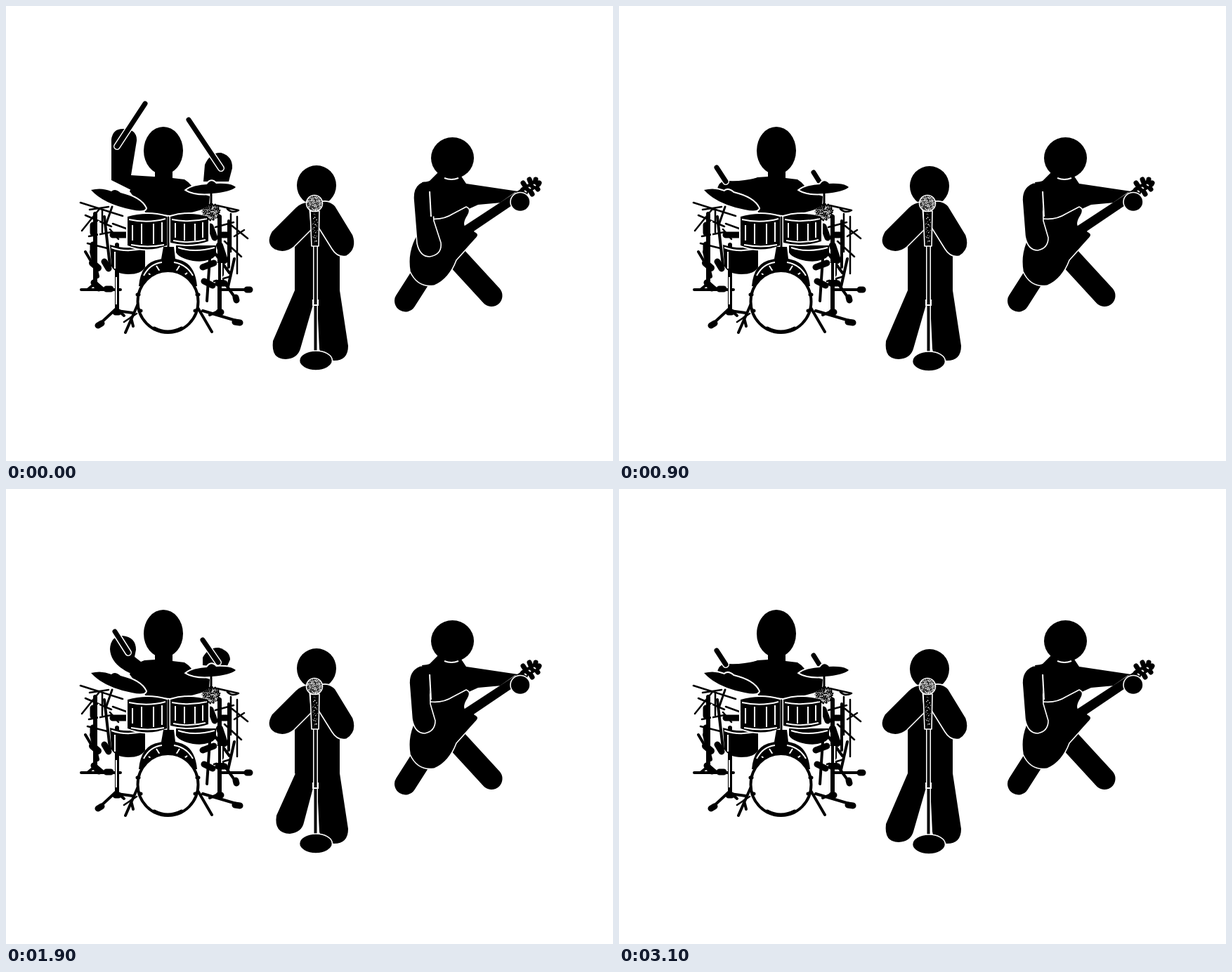
An HTML page that plays this animation: 864 px wide and 648 px high, repeating every 3200 ms.

```html
<!DOCTYPE html>
<html lang="en">
<head>
<meta charset="utf-8">
<title>Band</title>
<style>
  html, body { margin: 0; width: 100%; height: 100%; overflow: hidden; background: #fff; }
  svg { display: block; width: 100%; height: 100%; }
  .line { fill: none; stroke: #000; stroke-linecap: round; stroke-linejoin: round; }
  .limb { stroke-width: 31; }
  .rim { stroke: #fff; stroke-width: 4; paint-order: stroke; }
  .edge { stroke: #fff; stroke-width: 1.6; stroke-linejoin: round; }
  .shine { fill: none; stroke: #fff; stroke-width: 2; }
</style>
</head>
<body>
<svg viewBox="0 0 864 648">
  <!-- Drummer -->
  <g id="drummer">
    <ellipse cx="224" cy="206" rx="28" ry="34"/>
    <path d="M212 232H237V245L254 247Q264 253 268 263L290 271L289 284Q278 294 235 298L200 296L176 264Q182 249 197 244L212 243Z"/>
    <g data-poses="A">
      <path d="M150 190Q152 174 168 175Q187 176 186 192L178 241L210 243V290L180 263L150 248Z"/>
      <path d="M281 250L283 226Q291 208 306 209Q323 214 322 231L317 250Z"/>
    </g>
    <g data-poses="B">
      <path d="M149 223Q150 205 167 205Q185 206 185 222L183 238L192 246L212 245V290L178 263Q150 249 149 223Z"/>
      <path d="M280 250V238Q286 222 303 222Q319 226 319 240L313 253Z"/>
    </g>
    <g data-poses="C">
      <path d="M148 228Q149 209 166 209Q185 211 185 229L183 239L192 246L212 245V290L178 263Q149 250 148 228Z"/>
      <path d="M280 251V240Q288 225 303 226Q319 231 319 243L314 254Z"/>
    </g>
    <path data-poses="D" d="M140 263Q140 249 155 249Q176 250 195 245L205 290L180 272Z"/>
    <g id="sticks"></g>
  </g>

  <!-- Drum kit -->
  <g id="kit">
    <path class="line" stroke-width="6" d="M127 296V394M158 340V432M304 300V436M122 350L130 385"/>
    <path class="line" stroke-width="4" d="M107 404H163M128 394L116 404M128 394L140 404M158 430L130 456M158 434L180 437M158 432L168 441M188 424L170 465M178 444L181 456M272 428L293 464M280 434L334 450M304 434L290 440M303 404H349M308 390L328 418M317 306V372M325 360L316 400M140 300L148 370M290 360L286 420M113 350L126 372M296 350L318 380"/>
    <path class="line" stroke-width="2.5" d="M106 280L166 299M108 320L133 289M119 290L146 286M113 298L150 314M329 300V381M318 310L344 331M325 328L339 319M300 284L331 291Q322 296 315 289M118 328L150 322M116 338L144 345M311 335L335 357M320 296V350M298 315L324 308M168 450L186 438M137 290V322M152 310L174 318M278 300L298 323M296 392L320 385M148 318L160 332"/>
    <path class="line" stroke-width="9" d="M131 455L136 452M156 436H160M326 450L333 451M343 404H347M327 415L328 419M303 436H306M125 394L132 402M143 403H149M124 312V323M124 340V348M308 326H314M302 395H311M152 326H170M140 364L146 374M280 372L296 366M282 392L294 398M291 314L297 330"/>
    <path d="M148 340Q172 348 198 341V372Q193 382 174 382Q157 382 150 371ZM242 341H299V355Q289 366 266 363Q246 359 242 351Z"/>
    <path class="line" stroke-width="10" d="M304 341L311 362M305 372V382M123 366L131 373"/>
    <path class="shine" d="M150 344Q172 352 196 345M155 350V374M245 344Q268 352 297 344M132 306V334M157 386V425M301 366V390M307 366V390"/>
    <path class="rim" d="M173 300Q201 292 229 300V341Q202 352 173 341ZM234 300Q260 292 288 300V335Q262 344 234 337Z"/>
    <path class="shine" stroke-width="1.500" d="M175 304Q202 310 227 303M178 340Q202 345 225 340M236 304Q260 309 286 303M238 334Q260 339 284 333"/>
    <path class="shine" stroke-width="3" d="M180 312V334M193 310V339M210 310V339M222 308V336M241 309V330M254 310V334M269 310V334M280 308V330"/>
    <path class="line" stroke-width="3" d="M231 301V360"/>
    <path d="M224 343H239L241 360H221ZM189 399Q192 365 218 361Q231 356 245 361Q269 366 272 399Z"/>
    <path class="shine" d="M196 384Q205 367 222 365M239 365Q257 368 266 384M214 370L219 378M247 370L242 378M203 381L210 386M258 380L250 386"/>
    <ellipse cx="230.500" cy="421" rx="43" ry="44" fill="#fff" stroke="#000" stroke-width="4"/>
    <path class="line" stroke-width="5" d="M211 459Q230 469 250 459"/>
    <path class="line" stroke-width="5" d="M187 411H189M272 411H274M190 434H192M269 434H271"/>
    <path class="line" stroke-width="1.700" data-poses="E" d="M232 391V413M233 429V450M203 427L222 426M238 422H257M215 408L223 416M241 416Q247 412 250 404M239 430L251 438M219 439Q226 438 226 432"/>
    <path class="rim" d="M121 262Q136 258 150 264Q155 259 163 266Q192 273 199 288Q197 294 179 290Q139 282 121 262Z"/>
    <path class="rim" d="M257 262Q266 255 286 254Q292 245 299 253Q321 252 327 258Q319 265 293 267Q268 269 257 262Z"/>
    <path class="line" stroke-width="3" d="M151 286L142 312M292 267V286"/>
    <g id="clutch"></g>
  </g>

  <!-- Singer -->
  <g id="singer">
    <ellipse class="bob" cx="442" cy="255.500" rx="28" ry="28.500"/>
    <path d="M422 280H464L475 345V405L487 484Q487 505 467 505Q448 503 446 488L443 424H437L411 405V320Z"/>
    <path data-poses="ABDE" d="M414 385L411 405L380 477Q377 503 398 503Q415 502 419 488L438 422V385Z"/>
    <path data-poses="C" d="M414 385L412 405L385 465Q381 490 404 491Q421 489 424 475L438 422V385Z"/>
    <path class="edge" d="M431 279Q420 279 412 287L378 321Q368 338 382 347Q397 354 410 343L435 318Z"/>
    <path class="edge" d="M447 279Q460 275 469 285L494 326Q501 346 485 356Q472 359 464 346L444 314Q439 289 447 279Z"/>
    <path fill="none" stroke="#fff" stroke-width="7" d="M440.500 340V494"/>
    <path fill="none" stroke="#000" stroke-width="4" d="M440.500 340V496"/>
    <path class="shine" stroke-width="1.300" d="M437 418V426H444V418"/>
    <path class="edge" d="M433 292H446L445 342H435Z"/>
    <circle class="edge" cx="439" cy="281" r="11.500"/>
    <g id="grille"></g>
    <ellipse class="edge bob" cx="441" cy="505" rx="23.500" ry="14"/>
  </g>

  <!-- Guitarist -->
  <g id="guitarist">
    <path class="line limb" d="M594 380L568.500 420M640 357L691 412.500"/>
    <g data-poses="ACD">
      <ellipse cx="635.500" cy="216.500" rx="30.500" ry="29.500"/>
      <path d="M614 238H645L655 253L729 264L716 279L672 283L652 292L640 310H600V252Z"/>
      <path class="shine" stroke-width="1.300" d="M624 245Q634 249 644 245"/>
    </g>
    <g data-poses="BE">
      <ellipse cx="638" cy="220" rx="30.500" ry="29.500"/>
      <path d="M615 238H648L658 251Q692 255 721 267L711 281L668 283L652 292L640 310H600V252Z"/>
      <path class="shine" stroke-width="1.300" d="M626 249Q636 252 648 248"/>
    </g>
    <path class="edge" d="M604 303Q622 305 636 296L655 286Q663 289 657 299Q650 310 655 315L725 266L735 275L667 321Q676 325 668 332L641 362Q631 389 610 398Q586 402 575 378Q570 350 585 325Z"/>
    <path class="line" stroke-width="12" stroke-linecap="butt" d="M650 322L737 265"/>
    <path class="line" stroke-width="11" d="M737 263L754 254"/>
    <path class="line" stroke-width="7" d="M736 252L740 258M745 247L748 254M754 247L753 252M759 252L758 254M757 261L754 257M749 268L745 261"/>
    <path class="shine" stroke-width="1" d="M738 263L741 265M744 258L747 260M751 254L754 256"/>
    <ellipse class="edge" data-poses="ACD" cx="732" cy="279" rx="14" ry="13.500"/>
    <ellipse class="edge" data-poses="BE" cx="724" cy="283" rx="14" ry="13.500"/>
    <path data-poses="ABE" class="edge" d="M606 265Q605 249 594 250Q579 255 580 275L585 338Q589 357 603 357Q621 354 619 337L609 306Z"/>
    <path data-poses="CD" class="edge" d="M603 266Q602 250 589 252Q574 258 574 276L578 328Q582 348 596 348Q611 345 611 330L604 306Z"/>
    <path d="M592 251Q606 250 615 243L625 296L606 300Z"/>
    <path class="shine" stroke-width="1.500" d="M603 264L605 300"/>
  </g>
</svg>
<script>
const NS = "http://www.w3.org/2000/svg";
const FRAME_MS = 100;
// Raised arms open the loop, a four-step beat follows (strike E, lift D, up B, flick C),
// and a double strike closes it.
const SEQUENCE = "ADBC" + "EDBC".repeat(6) + "EDED";

// Each pose has a left and a right stick, tip to grip.
const STICKS = {
  A: ["M198 139L158 200", "M260 162L306 231"],
  B: ["M184 190L161 227", "M273 200L300 240"],
  C: ["M155 203L174 233", "M280 215L302 247"],
  D: ["M139 230L152 250", "M277 237L287 253"],
  E: ["M148 250L160 266", "M289 242L282 253"]
};

function add(parent, tag, attributes) {
  const node = document.createElementNS(NS, tag);
  for (const [name, value] of Object.entries(attributes)) node.setAttribute(name, value);
  document.getElementById(parent).append(node);
}

function random(seed) {
  const x = Math.sin(seed * 127.1) * 43758.5453;
  return x - Math.floor(x);
}

function speckle(parent, count, cx, cy, rx, ry, size, color) {
  for (let i = 1; i <= count; i++) {
    const angle = i * 2.39996;
    const radius = Math.sqrt(i / count);
    add(parent, "circle", {
      cx: cx + Math.cos(angle) * radius * rx,
      cy: cy + Math.sin(angle) * radius * ry,
      r: size * (0.4 + random(i) * 0.7),
      fill: color
    });
  }
}

for (const [pose, pair] of Object.entries(STICKS)) {
  for (const d of pair) {
    add("sticks", "path", { d, class: "line", style: "stroke:#fff;stroke-width:10", "data-poses": pose });
    add("sticks", "path", { d, class: "line", "stroke-width": 7, "data-poses": pose });
  }
}
speckle("clutch", 75, 292, 293, 13, 12, 1.6, "#000");
speckle("grille", 95, 439, 281, 10.5, 10.5, 1, "#fff");
speckle("grille", 28, 440, 317, 4, 22, 0.8, "#fff");

const posed = document.querySelectorAll("[data-poses]");
const bobbing = document.querySelectorAll(".bob");
let current;

function render(now) {
  const pose = SEQUENCE[Math.floor(now / FRAME_MS) % SEQUENCE.length];
  if (pose === current) return;
  current = pose;
  for (const node of posed) node.style.display = node.dataset.poses.includes(pose) ? "" : "none";
  const drop = "DE".includes(pose) ? 1 : 0;
  for (const node of bobbing) node.setAttribute("transform", `translate(0 ${drop})`);
}

const start = performance.now();
function tick() {
  render(performance.now() - start);
  requestAnimationFrame(tick);
}
tick();
</script>
</body>
</html>
```
